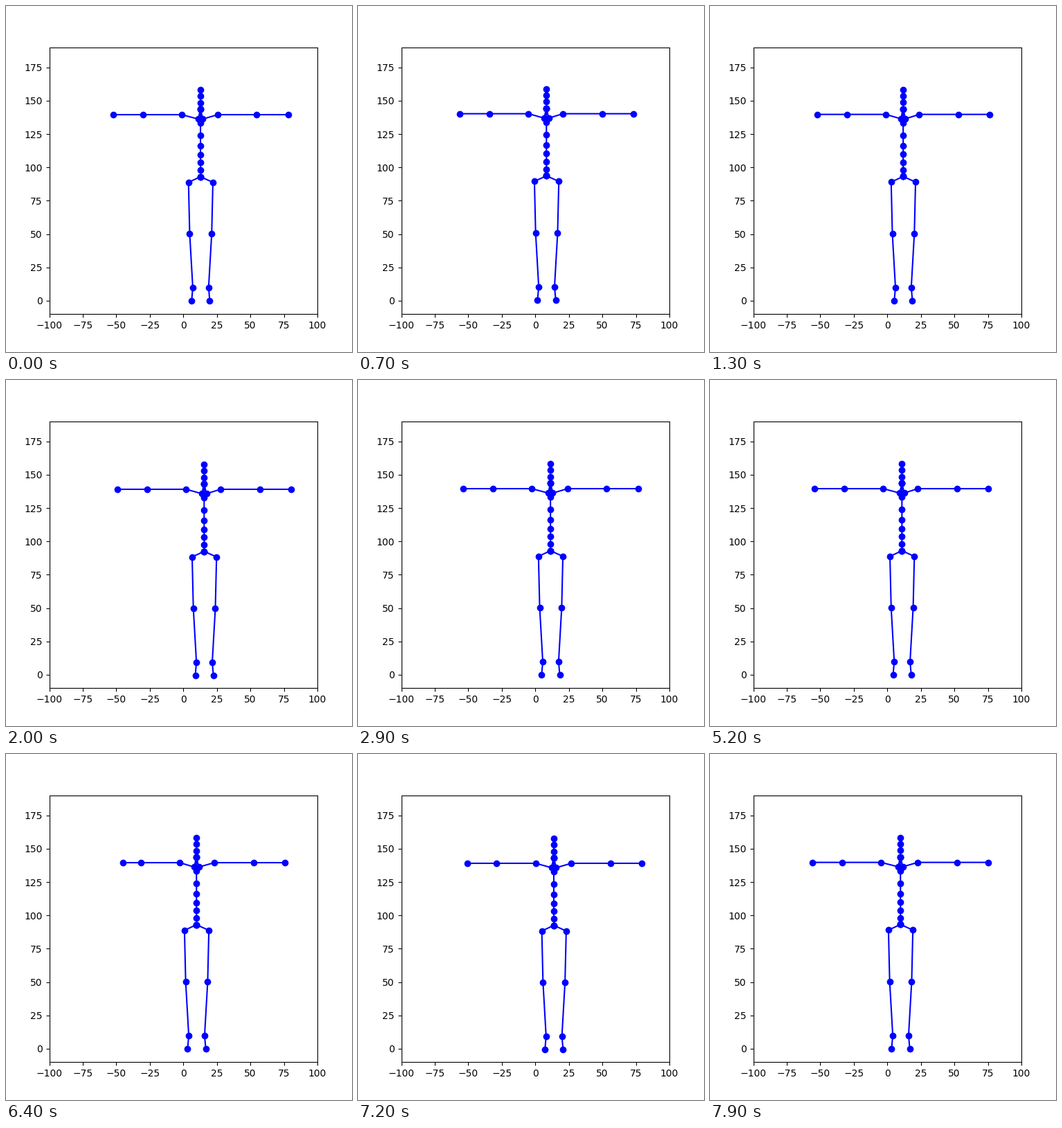
A matplotlib script that plays this animation: 500x500 px, repeating every 8000 ms.

```python
import numpy as np
import matplotlib.pyplot as plt
from matplotlib.animation import FuncAnimation

FRAMES, INTERVAL = 80, 100

# Key moments of the drift: body centre, lift and half the arm reach
KEYS = [0, 13, 29, 42, 52, 64, 79]
CENTRE = [12.8, 11.8, 11.3, 6.1, 10.9, 9.8, 9.8]
LIFT = [0, .2, 0, .9, 0, 0, .2]
LEFT_SHOULDER = [14, 13, 14, 13.4, 13.9, 12.4, 14.5]
RIGHT_SHOULDER = [12.9, 12, 12.8, 14.9, 11.8, 13.4, 12.9]

# Body proportions
SPINE = [93, 98.1, 103.8, 109.6, 116.2, 123.9, 133.3,
         *np.linspace(143.8, 158.3, 4)]
NECK = (0, 143.8)
LEG_X, LEG_Y = [9.1, 8.2, 5.9, 6.75], [88.8, 50.1, 9.8, -.1]
COLLAR_X, COLLAR_Y, ARM_Y = 1.7, 136.3, 139.6
UPPER_ARM, LEFT_FOREARM, RIGHT_FOREARM = 29.1, 22, 23.4
GAP = [(np.nan, np.nan)]


def locate(frame):
    """Index of the current key span and the progress through it."""
    i = min(np.searchsorted(KEYS, frame, "right") - 1, len(KEYS) - 2)
    return i, (frame - KEYS[i]) / (KEYS[i + 1] - KEYS[i])


def ease(values, i, u):
    return values[i] + (values[i + 1] - values[i]) * u * u * (3 - 2 * u)


def arm(side, shoulder, forearm):
    reach = np.cumsum([shoulder, UPPER_ARM, forearm])
    return ([NECK, (side * COLLAR_X, COLLAR_Y)]
            + [(side * x, ARM_Y) for x in reach] + GAP)


def leg(side):
    return ([(0, SPINE[0])]
            + [(.15 + side * x, y) for x, y in zip(LEG_X, LEG_Y)] + GAP)


def skeleton(frame):
    i, u = locate(frame)
    # the body leans left and right in turn between the keys
    sway = 4 * np.sin(np.pi * u) * (-1) ** (i + 1)
    # the left forearm briefly turns towards the viewer
    turn = 8.5 * np.exp(-((frame - 64) / 2) ** 2)

    pts = [(0, y) for y in SPINE] + GAP
    pts += arm(-1, ease(LEFT_SHOULDER, i, u), LEFT_FOREARM - turn)
    pts += arm(1, ease(RIGHT_SHOULDER, i, u), RIGHT_FOREARM)
    pts += leg(-1) + leg(1)
    offset = (ease(CENTRE, i, u) + sway, ease(LIFT, i, u) - .15 * sway)
    return (np.array(pts) + offset).T


fig, ax = plt.subplots(figsize=(5, 5), dpi=100)
ax.set_xlim(-100, 100)
ax.set_ylim(-10, 190)
ax.set_xticks(range(-100, 101, 25))
ax.set_yticks(range(0, 176, 25))
body, = ax.plot(*skeleton(0), "bo-")


def update(frame):
    body.set_data(*skeleton(frame))
    return body,


anim = FuncAnimation(fig, update, frames=FRAMES, interval=INTERVAL,
                     repeat=True, repeat_delay=0)
plt.show()
```
